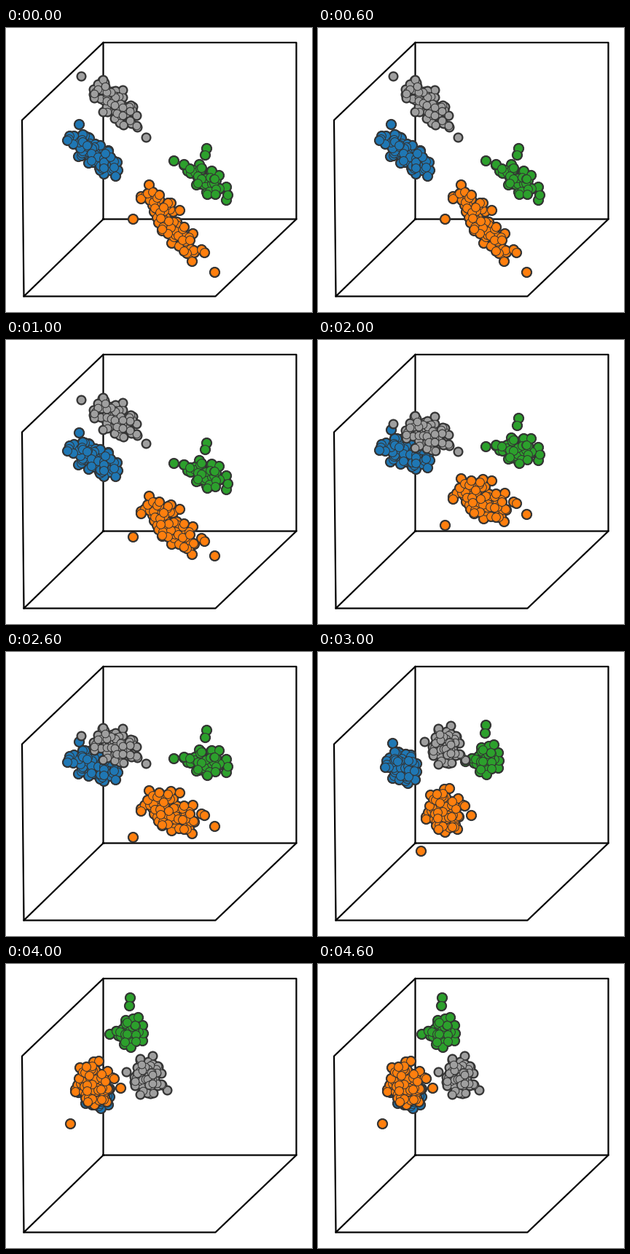
Animation of 420x390 px, one loop 5 s. Source, as a matplotlib script:

```python
import matplotlib.pyplot as plt
import numpy as np
from matplotlib.animation import FuncAnimation

W, H, DPI = 420, 390, 100
PT = 72 / DPI            # points per pixel
STEPS = 5
RIM = "#333333"

fig = plt.figure(figsize=(W / DPI, H / DPI), dpi=DPI, facecolor="white")
ax = fig.add_axes([0, 0, 1, 1])
ax.set_xlim(0, W)
ax.set_ylim(H, 0)
ax.axis("off")


def draw_box():
    top, right, corner, low = (133.5, 20), (398.5, 20), (398.5, 262.5), (133.5, 262.5)
    near, front = (24.5, 368.5), (287.5, 368.5)
    for path in ([low, top, right, corner, low],
                 [top, (22, 126.5), near, low],
                 [near, front, corner]):
        ax.plot(*zip(*path), color="black", lw=2.2 * PT, zorder=0,
                snap=False, solid_joinstyle="round")


def round_cloud(seed, n, reach=2.2):
    """Normal scatter with evenly ranked radii and no far tail."""
    rng = np.random.default_rng(seed)
    rank = (np.arange(n) + .5) / n * (1 - np.exp(-reach ** 2 / 2))
    r = np.sqrt(-2 * np.log(1 - rank))
    a = rng.uniform(0, 2 * np.pi, n)
    return rng.permutation(np.column_stack([r * np.cos(a), r * np.sin(a)]))


class Cluster:
    def __init__(self, seed, n, color, xs, ys, spread, lean, strays, size=7.6):
        self.z = np.vstack([strays, round_cloud(seed, n)])
        self.xs, self.ys = xs, ys
        self.spread, self.lean = spread, lean
        style = dict(zorder=1, lw=PT)
        self.rim = ax.scatter([], [], s=(2 * (size - .5) * PT) ** 2,
                              color=RIM, **style)
        self.dots = ax.scatter([], [], s=(2 * (size - 1.7) * PT) ** 2,
                               facecolor=color, edgecolor=RIM, **style)

    def pose(self, k):
        """Three leaning views on one horizontal axis, then two upright ones."""
        sx, sy = self.spread
        if k < 3:
            dx = sx * self.z[:, 0]
            dy = sy * self.z[:, 1] + self.lean * (1, .6, .25)[k] * dx
        else:
            dx = .62 * sx * self.z[:, 0]
            dy = 1.1 * sy * self.z[:, 1]
        return np.column_stack([self.xs[max(k - 2, 0)] + dx, self.ys[k] + dy])

    def show(self, k):
        for dots in (self.rim, self.dots):
            dots.set_offsets(self.pose(k))


draw_box()

clusters = [
    Cluster(3, 100, "#1f77b4", (122, 116, 123), (173, 163, 155, 157, 175),
            (18, 10.5), .5, [(-1.25, -2.8)]),
    Cluster(8, 90, "#ff7f0e", (229, 175, 122), (268, 253, 217, 216, 162),
            (22, 14), 1.05, [(-2.5, 3.7), (2.6, .5)]),
    Cluster(5, 52, "#2ca02c", (273, 229, 169), (207, 183, 150, 147, 93),
            (16, 10), .65, [(.1, -4.3), (0, -3.3), (-2.7, .3)]),
    Cluster(12, 84, "#9f9f9f", (147, 174, 193), (103, 107, 129, 130, 155),
            (18.5, 11), .68, [(-2.4, -.6), (2.45, 1.5), (.7, -2.4)], size=7),
]


def update(k):
    for c in clusters:
        c.show(k)
    return [a for c in clusters for a in (c.rim, c.dots)]


anim = FuncAnimation(fig, update, frames=STEPS, interval=1000, repeat=True,
                     repeat_delay=0, init_func=lambda: update(0), blit=False)
plt.show()
```
